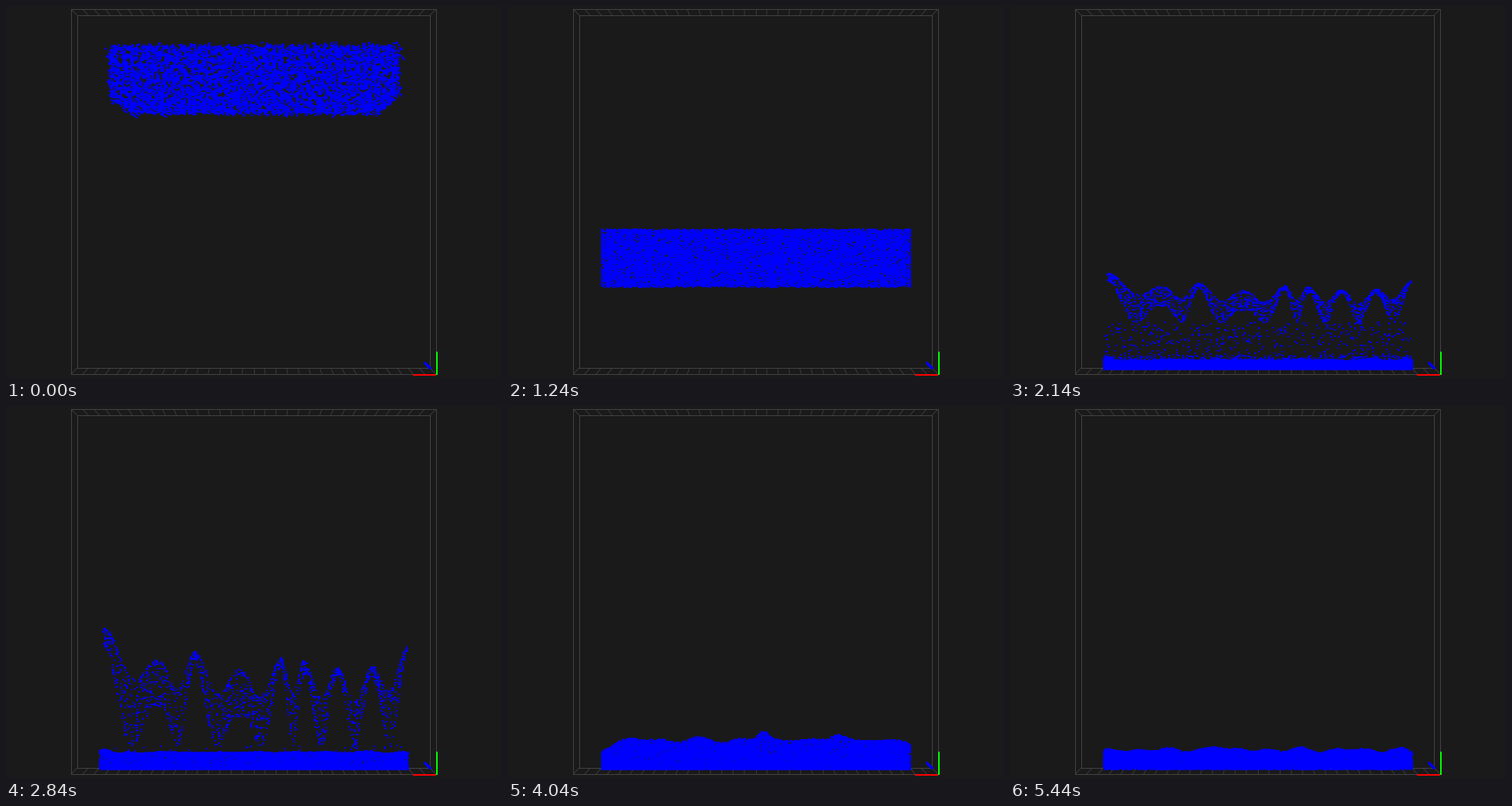
A matplotlib script for the animation above (5540 ms loop, 640 px wide and 480 px high).

```python
import numpy as np
import matplotlib.pyplot as plt
from matplotlib.animation import FuncAnimation
from matplotlib.collections import LineCollection

W, H, DPI = 640, 480, 100
PX = 72 / DPI
STEP_MS, LOOP_MS = 20, 5540
FLOOR, LEFT, RIGHT = 469, 121, 519
LAUNCH, APEX, HALF_G = 17, 29, 1.37

rng = np.random.default_rng(7)

# Particle sites on a jittered grid; each site holds several copies in depth.
COLS, ROWS, COPIES = 130, 40, 4
SITES = COLS * ROWS
N = SITES * COPIES
gu, gw = np.meshgrid(np.arange(COLS), np.arange(ROWS))


def per_site(values):
    return np.tile(values, COPIES)


u = per_site((gu.ravel() + rng.uniform(0.1, 0.9, SITES)) / COLS)
w = per_site((gw.ravel() + rng.uniform(0.1, 0.9, SITES)) / ROWS)
fuzz_x = per_site(rng.normal(0, 2.6, SITES))
fuzz_y = per_site(rng.normal(0, 2.0, SITES))
rough = per_site(rng.uniform(-0.8, 0.8, SITES))
off_x, off_w = rng.normal(0, 5, N), rng.normal(0, 0.08, N)

# Peaks of the splash: x, upper edge, lower edge.
PEAKS = np.array([
    (128, 287, 310), (198, 329, 388), (244, 317, 326), (302, 339, 402),
    (355, 326, 334), (385, 329, 345), (428, 339, 346), (472, 338, 350),
    (518, 311, 316)])
CREST_DIP, TROUGH_Y = 44, 438


def smooth(t):
    t = np.clip(t, 0, 1)
    return t * t * (3 - 2 * t)


def bump(x, mid, width):
    return np.exp(-((x - mid) / width) ** 2)


def fold(q):
    return 1 - np.abs(1 - np.abs(q))


def ripples(x, seed):
    """Smooth random surface, about -1 to 1."""
    r = np.random.default_rng(seed)
    return sum(np.sin(x / r.uniform(6, 14) + r.uniform(0, 6.3))
               for _ in range(4)) / 2.5


def launch_speed():
    """Upward speed per particle; zero for those that stay in the pool."""
    x = LEFT + u * (RIGHT - LEFT)
    px, upper, lower = PEAKS.T
    phase = np.interp(x, px, np.arange(len(px)))
    sag = 0.5 - 0.5 * np.cos(2 * np.pi * phase)
    crest = np.interp(x, px, upper) + CREST_DIP * sag
    trough = np.interp(x, px, lower)
    trough = trough + (TROUGH_Y - trough) * sag
    depth = (0.5 - 0.5 * np.cos(np.pi * rng.uniform(0, 1, N))) ** 1.2
    peak = crest + depth * (trough - crest)
    tau = APEX - LAUNCH
    sheet = (FLOOR - peak) / tau + HALF_G * tau + rng.normal(0, 0.08, N)
    kind = rng.uniform(0, 1, N)
    return np.select(
        [(kind < 0.09) & (x > 125), kind < 0.09, kind < 0.12, kind < 0.17],
        [sheet, 0, rng.uniform(7, 19, N), rng.uniform(6, 10.5, N)], 0)


speed = launch_speed()
off_x = np.where(speed > 0, 0, off_x)


def pool_height(x, k):
    """Depth of the settled layer at x."""
    flat = np.interp(k, [15, 17, 19, 22, 25, 29, 36],
                     [15, 17, 12, 12, 17, 22, 26])
    early = flat + ripples(x, 1) + 5 * bump(x, 126, 9) - 3 * bump(x, 146, 9)
    if k <= 30:
        return early
    shore = 12 * np.exp((LEFT - x) / 12) + 6 * np.exp((x - RIGHT) / 12)
    swell = smooth((k - 41) / 4) * 12
    choppy = (38 + 3 * ripples(x, 2) - shore
              + (12 + swell) * bump(x, 330, 9)
              + (8 + swell / 2) * bump(x, 426, 11))
    calm = 25 + 2.5 * ripples(x, 3) + 5 * bump(x, 268, 12) - shore / 4
    rise, settle = smooth((k - 34) / 7), np.clip((k - 44) / 11, 0, 1)
    late = choppy + (calm - choppy) * settle
    return early + (late - early) * rise


def positions(k):
    spread = np.interp(k, [0, 7, 17, 29, 41, 55],
                       [0.12, 1, 1, 0.12, 0.25, 0.18])
    q = fold(w + off_w * spread)

    # Loose block widening to the walls
    e = smooth(k / 6)
    half = 187 - 32 * np.clip(1 - q / 0.35, 0, 1) ** 2
    x_loose = 320 + (2 * u - 1) * half + fuzz_x
    x_wide = LEFT + u * (RIGHT - LEFT)
    x = x_loose + (x_wide - x_loose) * e + off_x * spread
    x = np.clip(x, LEFT - rough / 2, RIGHT + rough / 2)

    # Free fall
    d = k - 8
    top = 139.5 + 23.5 * d + 1.25 * d * d
    bottom = 210 + 23 * d + 1.5 * d * d
    top, bottom = 51 + (top - 51) * e, 139 + (bottom - 139) * e
    y = bottom + (top - bottom) * q + fuzz_y * (1 - e) + rough * e

    # Pool on the floor, with the splash thrown up from it
    if k >= 15:
        gap = 0.1 * bump(k, APEX, 6)
        lift = q - gap * np.sin(2 * np.pi * q)
        lift = lift ** (1 + 0.4 * bump(k, 42, 6))
        rest = np.minimum(FLOOR - lift * pool_height(x, k) + rough, FLOOR)
        if k > LAUNCH:
            tau = k - LAUNCH
            y = FLOOR - speed * tau + HALF_G * tau ** 2
        y = np.minimum(y, rest)
        lean = np.clip(1 - abs(k - LAUNCH) / 2, 0, 1)
        x = np.maximum(x, LEFT + 9 * q * lean)
    return np.round(x), np.round(y)


fig = plt.figure(figsize=(W / DPI, H / DPI), dpi=DPI, facecolor="#1a1a1a")
ax = fig.add_axes([0, 0, 1, 1])
ax.set_xlim(0, W)
ax.set_ylim(H, 0)
ax.axis("off")


def rect(x0, y0, x1, y1):
    return [(x0, y0), (x1, y0), (x1, y1), (x0, y1), (x0, y0)]


def draw_stage():
    x0, y0, x1, y1 = 84, 4, 555, 475
    a0, b0, a1, b1 = 92, 12, 547, 467
    ax.add_collection(LineCollection(
        [rect(x0, y0, x1, y1), rect(a0, b0, a1, b1)],
        colors="#424242", linewidths=PX, antialiaseds=False))
    ribs = []
    for t in np.linspace(0, 1, 33):
        xo, xi = x0 + t * (x1 - x0), a0 + t * (a1 - a0)
        ribs += [[(xo, y0), (xi, b0)], [(xo, y1), (xi, b1)]]
    ax.add_collection(LineCollection(
        ribs, colors="#424242", linewidths=0.8 * PX))
    for xs, ys, color in (((556, 556), (446, 476), "#00ff00"),
                          ((525, 555), (476, 476), "#ff0000"),
                          ((540, 548), (460, 468), "#0000ff")):
        ax.plot(xs, ys, color=color, lw=2 * PX, antialiased=False,
                solid_capstyle="butt")


draw_stage()
dots, = ax.plot([], [], "s", color="#0000ff", ms=2 * PX, mew=0,
                antialiased=False, zorder=5)


def update(i):
    ms = i * STEP_MS
    k = 0 if ms < 40 else 1 + (ms - 40) // 100
    dots.set_data(*positions(k))
    return dots,


anim = FuncAnimation(fig, update, frames=LOOP_MS // STEP_MS,
                     interval=STEP_MS, repeat=True, repeat_delay=0)
plt.show()
```
